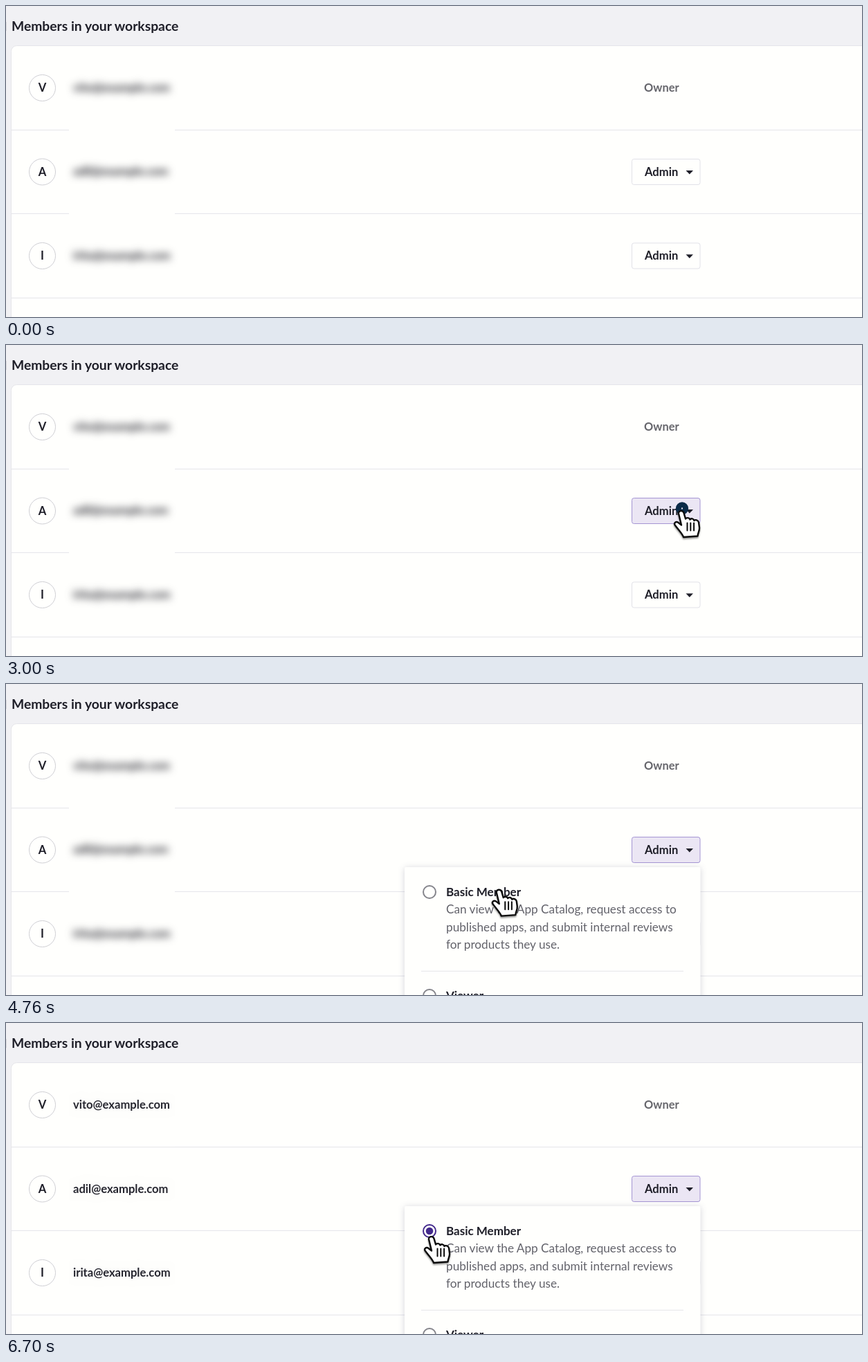
An HTML page for the animation above (6730 ms loop, 1237 px wide and 450 px high).

```html
<!DOCTYPE html>
<html lang="en">
<head>
<meta charset="utf-8">
<title>Workspace members</title>
<style>
  html, body { margin: 0; width: 100%; height: 100%; overflow: hidden; background: #f1f1f4; }
  svg { display: block; width: 1237px; height: 450px; }
  text { font: 700 16.6px Lato, "Open Sans", sans-serif; fill: #1f1f29; }
  .heading { font-size: 19.3px; }
  .option { font-size: 17px; }
  .note { font-weight: 400; font-size: 17.2px; fill: #62626a; }
  .owner { font-size: 16.4px; fill: #66666c; }
  .avatar { fill: #fffffd; stroke: #cfcfd4; }
  .initial { text-anchor: middle; }
  .line { stroke: #e5e5ea; }
  .button { fill: #fffffd; stroke: #e1e1e8; }
  .button.hover { fill: #ebe6f4; stroke: #a595d3; }
  .radio { fill: #fffffd; stroke: #85858b; stroke-width: 2; }
  .chosen .radio { stroke: #43298c; }
  .dot { fill: #43298c; visibility: hidden; }
  .chosen .dot { visibility: inherit; }
  #menu { filter: drop-shadow(0 1px 5px rgba(40, 40, 80, .2)); }
  #blurred text { filter: blur(6px); }
  #cursor { filter: drop-shadow(0 2px 1px rgba(0, 0, 0, .4)); }
</style>
</head>
<body>
<svg id="stage" viewBox="0 0 1237 450"></svg>
<script>
const LOOP = 6730;
const ROW = 121.5;
const emails = ["vito@example.com", "adil@example.com", "irita@example.com"];

const text = (x, y, words, kind = "") => `<text x="${x}" y="${y}" class="${kind}">${words}</text>`;
const line = (x1, x2, y) => `<path class="line" d="M${x1} ${y}H${x2}"/>`;
const emailColumn = y => emails.map((mail, i) => text(97, y + i * ROW, mail)).join("");

const avatar = (mail, i) => `
  <circle class="avatar" cx="52.5" cy="${118.5 + i * ROW}" r="19"/>
  ${text(52.5, 124 + i * ROW, mail[0].toUpperCase(), "initial")}`;

const roleButton = (id, y) => `
  <rect id="${id}" class="button" x="904.5" y="${y}" width="98.5" height="37" rx="3"/>
  ${text(923, y + 24, "Admin")}
  <path fill="#1f1f29" d="M982.5 ${y + 16.5}h10.5l-5.2 5.5z"/>`;

const option = (id, y, name) => `
  <g id="${id}">
    <circle class="radio" cx="612" cy="${y}" r="9"/>
    <circle class="dot" cx="612" cy="${y}" r="5.3"/>
  </g>
  ${text(636, y + 6, name, "option")}`;

const notes = [
  "Can view the App Catalog, request access to",
  "published apps, and submit internal reviews",
  "for products they use."
];

document.getElementById("stage").innerHTML = `
  <rect width="1237" height="450" fill="#f1f1f4"/>
  <rect y="23" width="1" height="13" fill="#dadade"/>
  ${text(8, 36, "Members in your workspace", "heading")}
  <rect x="7.5" y="57.5" width="1250" height="420" rx="8" fill="#fffffd" stroke="#e5e5ea"/>
  ${[179.5, 300.5, 422.5].map(y => line(8, 1237, y)).join("")}
  ${emails.map(avatar).join("")}
  ${emailColumn(124)}
  <g id="blurred">
    <rect x="91" y="95" width="153" height="290" fill="#fffffd"/>
    ${emailColumn(123.5)}
  </g>
  ${text(922, 124, "Owner", "owner")}
  ${roleButton("role", 221.5)}
  ${roleButton("role2", 343)}
  <g id="menu">
    <rect x="576" y="265" width="427.5" height="220" rx="2" fill="#fffffd"/>
    ${option("basic", 301, "Basic Member")}
    ${notes.map((words, i) => text(636, 332 + i * 25.5, words, "note")).join("")}
    ${line(600, 979, 415.5)}
    ${option("viewer", 451, "Viewer")}
  </g>
  <circle id="ring" fill="none" stroke="#0a2a47" stroke-width="8"/>
  <g id="cursor" stroke="#0b0b0b" stroke-width="2.4" stroke-linecap="round" stroke-linejoin="round">
    <path fill="#fff" d="M7 5C6.5 .3 13.3-.2 14.5 4L17 12.5C18.5 10.5 22.5 10.5 23.5 13.5C25 11.5 28.5 12 29.5 15
      C31 13.5 35 14 36 17.5L37 25C37.5 30 35 32 34.5 37.5L14 39C13 35 8 30 2 22C-.5 19 3 15.5 6.5 18L11 21.5Z"/>
    <path stroke-width="2" d="M19.5 18.5v11M24.3 18.5v11M29.1 18.5v11"/>
  </g>`;

const el = id => document.getElementById(id);
const [role, menu, basic, ring, cursor, blurred] =
  ["role", "menu", "basic", "ring", "cursor", "blurred"].map(el);
const clamp = v => Math.min(1, Math.max(0, v));
const span = (t, from, to) => clamp((t - from) / (to - from));
const show = (node, on) => node.setAttribute("visibility", on ? "visible" : "hidden");

// Top left corner of the hand
function cursorAt(t) {
  if (t < 3930) {
    const rest = 1 - span(t, 1630, 1830);
    const y = -31 + 231 * span(t, 960, 1630) + 39 * (1 - rest * rest);
    return [965 + (239 - y) * .307, y];
  }
  const p = span(t, 3930, 5130);
  const e = .6 * p + .2 * (1 - Math.cos(Math.PI * p));
  return [965 - 361 * e, 239 + 69 * e ** .57];
}

function drawRing(t) {
  const second = t >= 5500;
  const age = t - (second ? 5500 : 3000);
  const on = age >= 0 && age < 430;
  show(ring, on);
  if (!on) return;
  ring.setAttribute("cx", second ? 617.5 : 977);
  ring.setAttribute("cy", second ? 306 : 236.5);
  ring.setAttribute("r", 5 + age * .153);
  ring.setAttribute("opacity", 1 - (age / 430) ** 1.4);
}

function draw(t) {
  show(cursor, t >= 960);
  cursor.setAttribute("transform", `translate(${cursorAt(t)})`);
  role.classList.toggle("hover", t >= 1700);
  show(menu, t >= 3130);
  basic.classList.toggle("chosen", t >= 5600);
  blurred.setAttribute("opacity", 1 - span(t, 6260, 6720));
  drawRing(t);
}

const start = performance.now();
function tick() {
  draw((performance.now() - start) % LOOP);
  requestAnimationFrame(tick);
}
tick();
</script>
</body>
</html>
```
